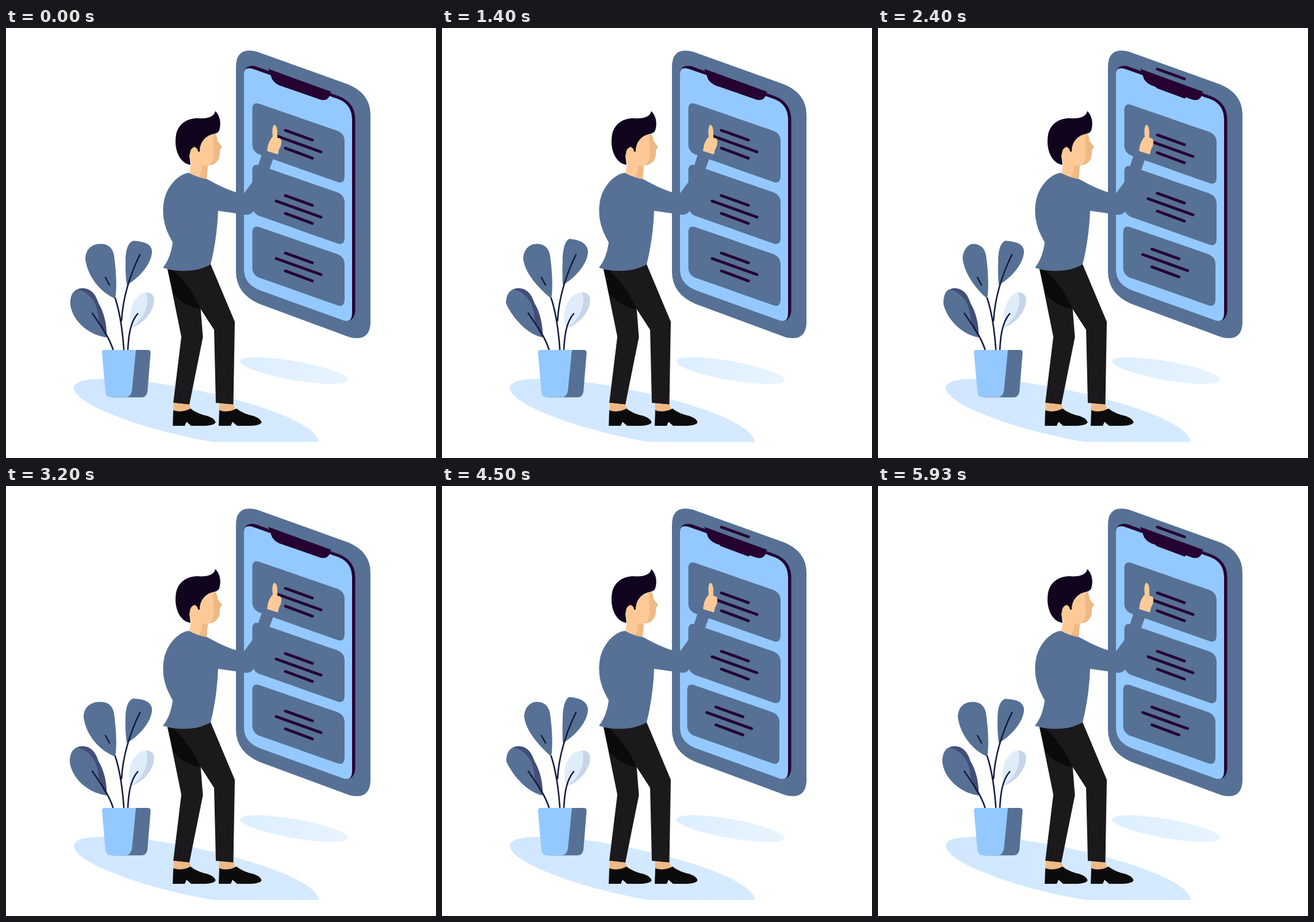
Write an HTML page that moves like this. It is 748x748 px and loops after 6010 ms.

```html
<!DOCTYPE html>
<html lang="en">
<head>
<meta charset="utf-8">
<title>Man using a giant phone</title>
<style>
html, body { margin: 0; width: 100%; height: 100%; overflow: hidden; background: #fff }
svg { display: block; width: 100%; height: 100% }
.blue { fill: #567195 }
.sky { fill: #94c9ff }
.ink { fill: #250232 }
.skin { fill: #fdca97 }
.shade { fill: #efb985 }
.pants { fill: #1b191b }
.black { fill: #0c0b0c }
.lines { fill: none; stroke: #250232; stroke-width: 5; stroke-linecap: round }
.stem { fill: none; stroke: #141b40; stroke-width: 2.6; stroke-linecap: round }
</style>
</head>
<body>
<svg viewBox="0 0 748 748">
  <defs>
    <linearGradient id="floor">
      <stop stop-color="#d0e7ff"/><stop offset="1" stop-color="#d6eaff"/>
    </linearGradient>
    <linearGradient id="shadow">
      <stop stop-color="#dceeff"/><stop offset="1" stop-color="#e8f4ff"/>
    </linearGradient>
    <path id="card" class="blue" d="M428.5 141Q428.5 128 441 132L577 179Q589 184 589 197V257Q589 272 577 268L441 220Q428.5 215 428.5 202Z"/>
    <path id="text" class="lines" d="M486 178L533 195M470 187.500L548 215.500M486 209L533 226.500"/>
    <path id="shoe" class="black" d="M291 665Q306 670 321 662Q332 671 351 675Q364 680 364.500 686Q362 692 340 692H322L314 685L311 692H290Z"/>
  </defs>

  <path fill="url(#floor)" d="M118 625C120 606 185 608 250 616C380 634 540 680 544 720H360C270 706 118 660 118 625Z"/>
  <ellipse fill="url(#shadow)" cx="501.500" cy="596" rx="95.500" ry="16.500" transform="rotate(10 501.500 596)"/>

  <!-- plant -->
  <path id="leafA" class="blue"/>
  <path id="leafB" class="blue"/>
  <path id="leafC" fill="#434d77"/>
  <path id="leafCFront" class="blue"/>
  <path id="leafD" fill="#dfecfa"/>
  <path fill="#c7d5ea" d="M244 460C257 460 260 470 256 484C250 501 236 515 218 522C241 505 250 481 244 460Z"/>
  <path class="stem" d="M173 434L180 447M190 470C199 498 203 530 205 559M233 394C213 435 203 475 201 509M150 496C170 525 180 540 186 559M229 497C215 513 213 540 212 559"/>
  <path class="blue" d="M172 560H247Q252 560 251.500 566L246 633Q244 642.500 236 642.500H184L190 575Z"/>
  <path class="sky" d="M171 560H226L219 631Q217 642.500 207 642.500H183Q174 642.500 173 634L167 566Q166 560 171 560Z"/>

  <!-- phone -->
  <path class="blue" d="M400 68Q400 32 436 41L595 98Q634 114 634 151V514Q632 546 598 538L441 480Q401 463 400 425Z"/>
  <path class="ink" d="M414 76Q418 63 434 66.500L580 119Q607.500 130 607.500 160V490Q607 509 592 510Z"/>
  <path class="sky" d="M414 79Q414 67 429 71L579 124Q601 133 602 158V495Q602 513 588 509L441 456Q414 445 414 420Z"/>
  <path class="ink" d="M456 71L566 111Q563 113 563 118Q559 127 548 125L476 100Q463 94 461 84Q460 77 456 71Z"/>
  <g id="screen"></g>

  <!-- man -->
  <path class="pants" d="M281 419L305 537L291 652L319 655L342.500 538L338 480Z"/>
  <path class="pants" d="M281 419Q320 426 356 411L398 511L395.500 655L365 652L362 525L338 488Z"/>
  <path class="black" d="M281 420L291 462Q309 484 338 489Q326 455 290 421Z"/>
  <path class="shade" d="M292 652L319 655L323 665Q306 672 291 667Z"/>
  <path class="shade" d="M371 653L395.500 655L400 665Q384 672 370 667Z"/>
  <use href="#shoe"/>
  <use href="#shoe" x="80"/>
  <path class="skin" d="M323 230L319 253Q335 264 349 263L352 235Z"/>
  <path class="shade" d="M340 239Q342 252 335 259Q342 263 349 263L351 238Z"/>
  <path class="skin" d="M325 205L362 182Q368 188 367.500 196L376 207Q371 211 372 218Q371 236 354 239Q345 242 324 236Z"/>
  <path class="shade" d="M362 182Q368 188 367.500 196L376 207Q371 211 372 218Q371 236 354 239C368 226 356 203 362 182Z"/>
  <path fill="#10041f" d="M321 238C303 236 291 212 296 185C300 165 318 156 335 157C350 158 362 155 364 144.500C372 152 375 165 371 178Q369 183 362 184C348 187 337 197 337 215H333L328 206L319 222Z"/>
  <path class="skin" d="M334 215C333 206 325 205 321 213C318 222 320 233 324 236L334 232Z"/>
  <path class="blue" d="M318 252C300 254 280 275 275 300C269 333 280 355 290 373C287 395 280 408 273 417C300 426 335 424 356 411C364 380 368 345 369 318L418 325Q428 326 434 312L468 219L447 214L430 266L413 289C390 284 370 274 350 263Q335 261 318 252Z"/>
  <path class="skin" d="M454 214L456 203Q459 194 464 189Q462 173 466 168.500Q471 168 472 179V191Q479 191 479 197Q479 206 475 211L473 220Z"/>
</svg>
<script>
const $ = id => document.getElementById(id);
const draw = (id, d) => $(id).setAttribute('d', d);
const use = (id, x, y) => `<use href="#${id}" x="${x}" y="${y}"/>`;

// Each item is [x, y] relative to the first card.
const layout = (cards, texts) =>
  cards.map(p => use('card', ...p)).join('') + texts.map(p => use('text', ...p)).join('');
const screens = [
  layout([[0, 0], [0, 107], [0, 214.5]], [[0, 0], [0, 113.500], [0, 213.500]]),
  layout([[0, 2], [0, 109], [-2, 214.5]], [[0, -106.500], [0, 8], [0, 109.500], [-9.500, 206.500]])
];

// A ripple runs along the left edge of each leaf.
function sway(angle) {
  const wave = (a, b) => a * Math.cos(angle) + b * Math.sin(angle);
  const low = wave(-5, 0);

  const a = 140.5 + wave(-2.5, -8);
  draw('leafA', `M166 375.500C${a + 10} 375 ${a} 386 ${a} 402C${a + 4} 432 ${a + 30 + low} 459 190 471
    C193 454 192 425 188 396C186 383 178 376 166 375.500Z`);

  const b = 209 + wave(-1, -0.5), top = 368.5 + wave(1.5, -1);
  draw('leafB', `M222 ${top}C${b + 3} ${top + 3} ${b} 389 ${b} 405Q${b - 1} 424 210 447
    C229 437 254 411 254 388C252 374 240 ${top + 2} 222 ${top}Z`);

  const c = 112 + wave(0, -2);
  const edge = `C${c + 31 + low} 533 ${c + 6 + low} 503 ${c} 479`;
  draw('leafC', `M133 452.500C148 453 156 463 161 479C171 495 176 519 175 538
    ${edge}C${c} 464 ${c + 7} 453 133 452.500Z`);
  draw('leafCFront', `M123 455C140 457 157 473 160 497Q162 522 175 538${edge}Q${c} 460 123 455Z`);

  const d = 214.5 + wave(1.5, -4.3);
  draw('leafD', `M244 460C${d + 14} 460 ${d + 1} 479 ${d} 500Q${d} 518 218 522C241 507 251 481 244 460Z`);
}

let shown = -1;
function frame(now) {
  const t = now % 6010;
  // Two poses per 100 ms, held 30 and 70 ms.
  const step = Math.min(119, 2 * Math.floor(t / 100) + (t % 100 >= 30));
  sway(step % 60 / 60 * 2 * Math.PI);
  const page = step % 60 < 30 ? 0 : 1;
  if (page !== shown) $('screen').innerHTML = screens[shown = page];
  requestAnimationFrame(frame);
}
frame(0);
</script>
</body>
</html>
```
